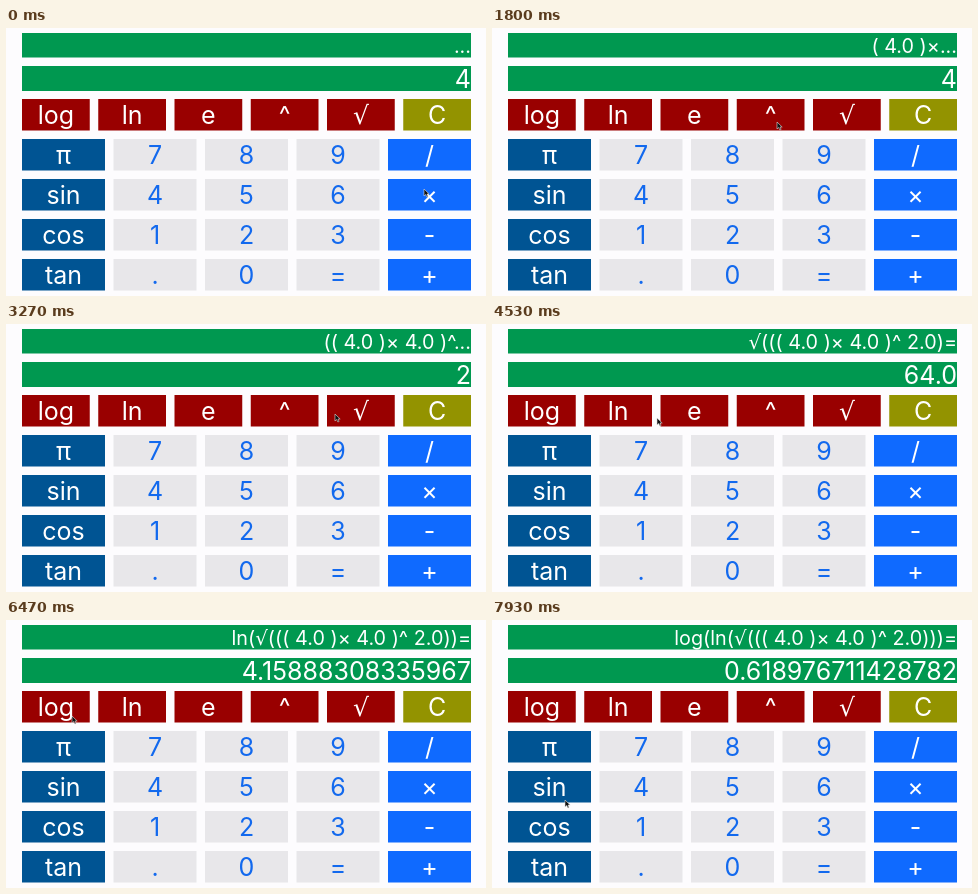
An HTML page for the animation above (8000 ms loop, 480 by 268 pixels).

```html
<!DOCTYPE html>
<html lang="en">
<head>
<meta charset="utf-8">
<title>Calculator</title>
<style>
  html, body { margin: 0; width: 100%; height: 100%; overflow: hidden; background: #fdfcfe; }
  svg { display: block; width: 100vw; height: 100vh; }
  text { font: 400 25px Inter, Roboto, sans-serif; font-feature-settings: "calt" 0; fill: #fff; }
  .key { text-anchor: middle; }
  .screen { text-anchor: end; }
  .small { font-size: 19.8px; }
  .root { font-family: "DejaVu Sans", sans-serif; }
</style>
</head>
<body>
<svg id="stage" viewBox="0 0 480 268">
  <rect x="16" y="5" width="449" height="24.5" fill="#009850"/>
  <rect x="16" y="38" width="449" height="25" fill="#009850"/>
  <text id="formula" class="screen small" x="465" y="24.5"></text>
  <text id="result" class="screen" x="465" y="60"></text>
  <g id="keys"></g>
  <path id="cursor" d="M0 0V7L1.7 5.5L2.9 8L4.1 7.4L3 5H5.2Z" fill="#111" stroke="#ddd" stroke-width=".6"/>
</svg>
<script>
const LOOP = 8000, FRAME = 1000 / 15;
const RED = '#990000', OLIVE = '#939300', NAVY = '#005493', GREY = '#e8e7ea', BLUE = '#0f6aff';
const $ = id => document.getElementById(id);
const labels = {};

function add(tag, attrs, parent) {
  const el = document.createElementNS('http://www.w3.org/2000/svg', tag);
  for (const name in attrs) el.setAttribute(name, attrs[name]);
  return parent.appendChild(el);
}

function addKey(label, x, y, width, color) {
  add('rect', { x, y, width, height: 31.5, fill: color }, $('keys'));
  const text = add('text', { class: label === '√' ? 'key root' : 'key', x: x + width / 2, y: y + 25 }, $('keys'));
  text.textContent = label;
  if (color === GREY) text.style.fill = '#1269ee';
  labels[label] = text;
}

['log', 'ln', 'e', '^', '√', 'C'].forEach((label, i) =>
  addKey(label, 16 + i * 76.25, 71, 67.75, i === 5 ? OLIVE : RED));

['π 7 8 9 /', 'sin 4 5 6 ×', 'cos 1 2 3 -', 'tan . 0 = +'].forEach((row, r) =>
  row.split(' ').forEach((label, c) =>
    addKey(label, 16 + c * 91.5, 111 + r * 40, 83, c === 0 ? NAVY : c === 4 ? BLUE : GREY)));

// Each press: key, time down, time up; then the screen after release
const presses = [
  ['×', 130, 260, '( 4.0 )×...', '4'],
  ['4', 1000, 1100, '( 4.0 )×...', '4'],
  ['^', 1960, 2070, '(( 4.0 )× 4.0 )^...', '4'],
  ['2', 2730, 2840, '(( 4.0 )× 4.0 )^...', '2'],
  ['√', 3600, 3710, '√((( 4.0 )× 4.0 )^ 2.0)=', '64.0'],
  ['ln', 5380, 5500, 'ln(√((( 4.0 )× 4.0 )^ 2.0))=', '4.15888308335967'],
  ['log', 6800, 6920, 'log(ln(√((( 4.0 )× 4.0 )^ 2.0)))=', '0.618976711428782']
];

// Cursor stops: time, x, y
const path = [
  [0, 418, 161], [330, 418, 161], [930, 148, 168], [1170, 148, 168],
  [1730, 285, 94], [2130, 285, 94], [2650, 241, 208], [2900, 241, 208],
  [3270, 329, 90], [3440, 350, 88], [3900, 350, 88], [4530, 165, 94],
  [4930, 137, 84], [5730, 137, 84], [6330, 66, 96], [7070, 66, 96],
  [7800, 73, 180], [8000, 73, 180]
];

const ease = p => p * p * (3 - 2 * p);

function cursorAt(t) {
  const i = path.findIndex(stop => stop[0] > t);
  const [t0, x0, y0] = path[i - 1], [t1, x1, y1] = path[i];
  const p = ease((t - t0) / (t1 - t0));
  return [x0 + (x1 - x0) * p, y0 + (y1 - y0) * p];
}

function keyOpacity(t, down, up) {
  if (t < down) return 1;
  return t < up ? 0.25 : Math.min(1, 0.25 + (t - up) / 300);
}

let shown;
function showScreen(formula, result) {
  if (shown === formula + result) return;
  shown = formula + result;
  $('formula').replaceChildren();
  for (const part of formula.split(/(√)/)) {
    add('tspan', part === '√' ? { class: 'root' } : {}, $('formula')).textContent = part;
  }
  $('result').textContent = result;
}

function draw(now) {
  const t = Math.floor((now % LOOP + 4) / FRAME) * FRAME % LOOP;
  let screen = ['...', '4'];
  for (const [key, down, up, ...next] of presses) {
    labels[key].style.opacity = keyOpacity(t, down, up);
    if (t >= up) screen = next;
  }
  showScreen(...screen);
  $('cursor').setAttribute('transform', `translate(${cursorAt(t)})`);
}

const start = performance.now();
function tick() {
  draw(performance.now() - start);
  requestAnimationFrame(tick);
}
tick();
</script>
</body>
</html>
```
